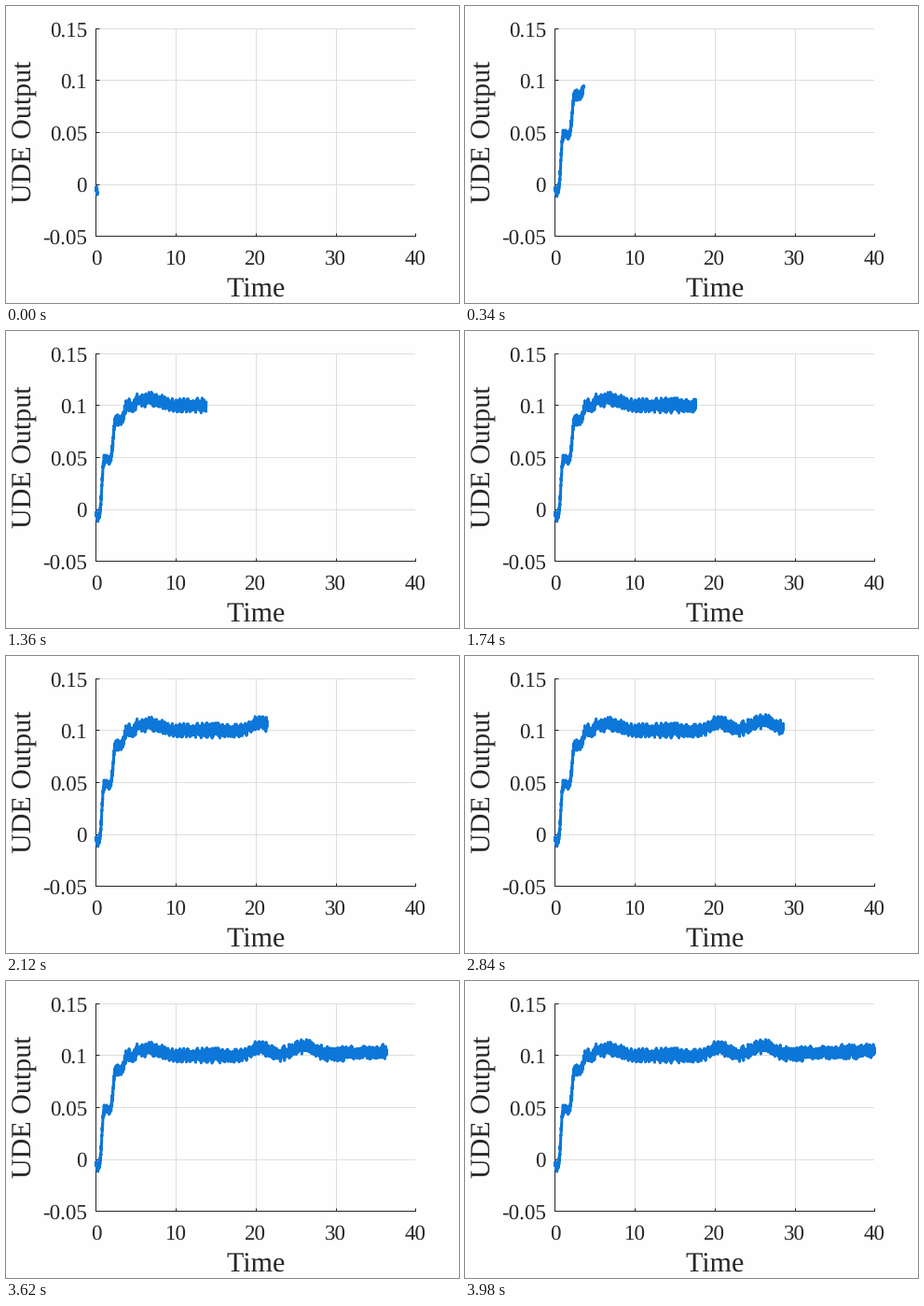
A matplotlib script for the animation above (4000 ms loop, 486 px wide and 318 px high).

```python
import numpy as np
import matplotlib.pyplot as plt
from matplotlib.animation import FuncAnimation

W, H, DPI = 486, 318, 72            # at 72 dpi one point is one pixel
FRAMES, INTERVAL = 200, 20
LEFT, RIGHT, TOP, BOTTOM = 96.4, 439.4, 23.7, 246.2
T_END, Y_MIN, Y_MAX = 40, -0.05, 0.15
STEPS = 20                          # samples drawn per frame
INK, GRID, BLUE = "#262626", "#dedede", "#0c77d8"

plt.rcParams.update({"font.family": "Liberation Serif",
                     "text.kerning_factor": 6,
                     "text.hinting": "none"})


def rise(t, centre, width):
    return 0.5 + 0.5 * np.tanh((t - centre) / width)


def bump(t, centre, width):
    return np.exp(-0.5 * ((t - centre) / width) ** 2)


def response():
    """Stepped climb with a fading ripple, slow drift and sensor noise."""
    start, period = 0.75, 1.4
    t = np.linspace(0, T_END, FRAMES * STEPS + 1)
    mean = -5 + 3 * np.sin(2 * np.pi * (t - start) / period) * np.exp(-t / 4)
    for k, height in enumerate([53, 38, 13, 7]):
        mean += height * rise(t, start + k * period, 0.2)
    mean += 5 * rise(t, 33, 6) - 6.5 * rise(t, 8.2, 1)
    mean += 8 * bump(t, 20.6, 0.95) + 8.5 * bump(t, 25.9, 1.4)
    sigma = 2.1 + 0.6 * rise(t, 3, 1)
    noise = np.random.default_rng(7).standard_normal(t.size)
    return t, (mean + sigma * np.clip(noise, -2.7, 2.7)) / 1000


def label(x, y, text, size, ha="center", **kw):
    fig.text(x / W, 1 - y / H, text, fontsize=size, color=INK, ha=ha,
             va="baseline", **kw)


fig = plt.figure(figsize=(W / DPI, H / DPI), dpi=DPI, facecolor="#fefefe")
ax = fig.add_axes([LEFT / W, 1 - BOTTOM / H, (RIGHT - LEFT) / W, (BOTTOM - TOP) / H],
                  facecolor="#fefefe")
ax.set(xlim=(0, T_END), ylim=(Y_MIN, Y_MAX),
       xticks=np.arange(0, 41, 10), yticks=np.arange(-1, 4) * 0.05)
ax.set_axisbelow(True)
ax.grid(color=GRID, linewidth=1)
ax.tick_params(direction="in", length=3.5, width=1, color=INK,
               labelbottom=False, labelleft=False)
ax.spines[["top", "right"]].set_visible(False)
ax.spines[["left", "bottom"]].set(color=INK, linewidth=1)

for v in ax.get_xticks():
    label(LEFT + (RIGHT - LEFT) * v / T_END, 277, f"{v:g}", 23)
for v in ax.get_yticks():
    y = BOTTOM - (BOTTOM - TOP) * (v - Y_MIN) / (Y_MAX - Y_MIN)
    label(87, y + 8.7, f"{v:g}", 23, ha="right")
label(268, 312, "Time", 30)
label(28, 135, "UDE Output", 30, rotation=90, rotation_mode="anchor")

time, output = response()
curve, = ax.plot([], [], color=BLUE, linewidth=3, solid_joinstyle="round",
                 solid_capstyle="butt", clip_on=False, zorder=5)


def draw(i):
    n = (i + 1) * STEPS + 1
    curve.set_data(time[:n], output[:n])
    return curve,


anim = FuncAnimation(fig, draw, frames=FRAMES, interval=INTERVAL,
                     repeat=True, repeat_delay=0, blit=False)
plt.show()
```
